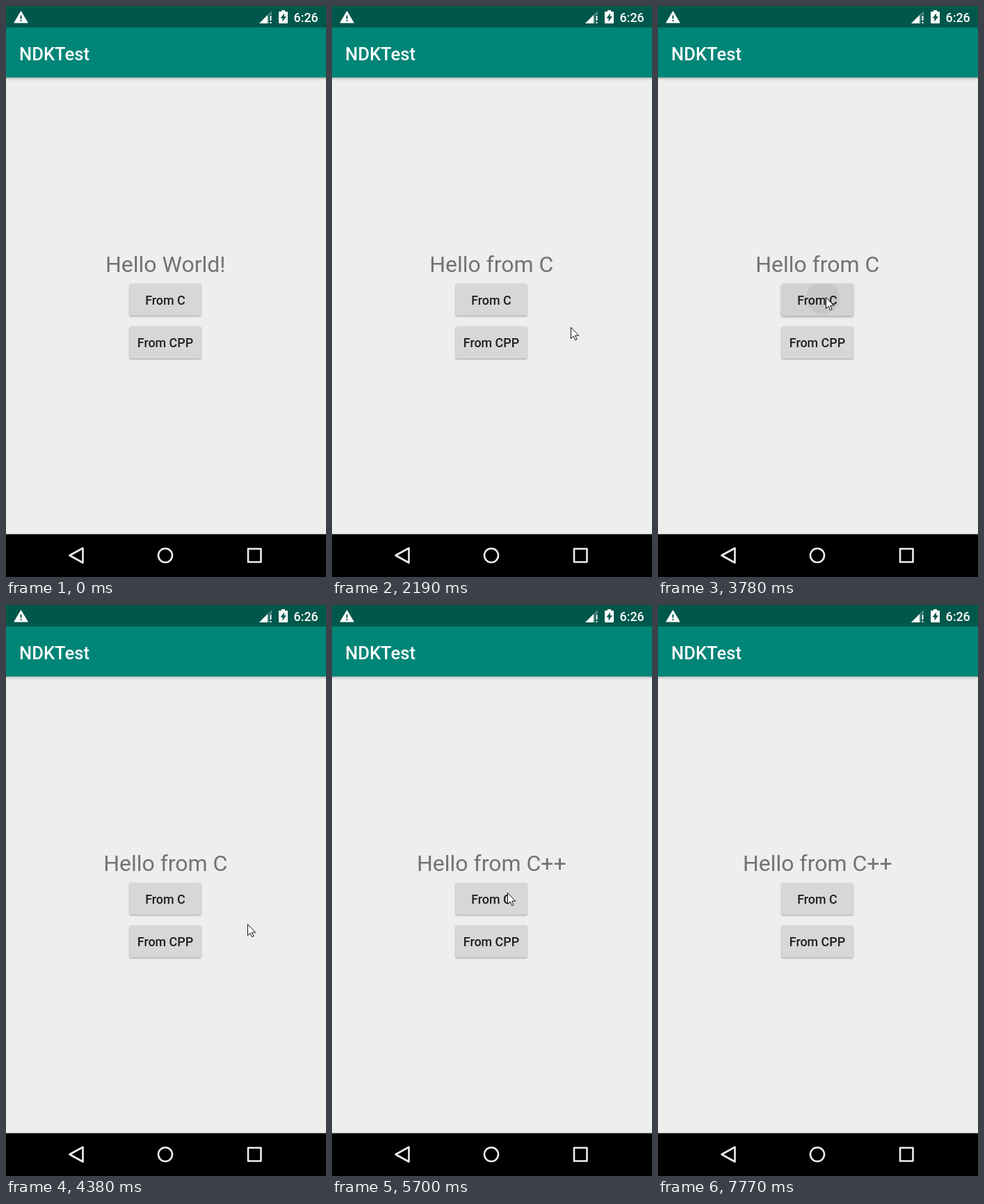
An HTML page with a canvas for the animation above (8.97 s loop, 460 by 820 pixels).

```html
<!DOCTYPE html>
<html lang="en">
<head>
<meta charset="utf-8">
<title>NDKTest</title>
<style>
  html, body { margin: 0; width: 100%; height: 100%; overflow: hidden; background: #eee; }
  canvas { display: block; }
</style>
</head>
<body>
<canvas id="stage" width="460" height="820"></canvas>
<script>
const ctx = document.getElementById('stage').getContext('2d');
const LOOP = 8970, STEP = 30, ENTER = 510, EXIT = 7770;
const DP = 1.28;  // stage pixels per layout unit

const BUTTONS = {
  c: { y: 398.6, label: 'From C', greeting: 'Hello from C' },
  cpp: { y: 460.1, label: 'From CPP', greeting: 'Hello from C++' }
};
const LEFT = 177.4, WIDTH = 103.2, HEIGHT = 36 * DP;

// When the pointer arrives, when it clicks, and where.
const CLICKS = [
  { arrive: 1140, at: 1440, name: 'c', tip: [241, 423] },
  { arrive: 2490, at: 2580, name: 'cpp', tip: [250, 478] },
  { arrive: 3570, at: 3780, name: 'c', tip: [241, 418] },
  { arrive: 4710, at: 4860, name: 'cpp', tip: [250, 478] },
  { arrive: 5820, at: 6000, name: 'c', tip: [230, 411] },
  { arrive: 6960, at: 7080, name: 'cpp', tip: [250, 488] }
];

// Between clicks the pointer swings out to the right and comes back.
const legs = [{ start: ENTER, end: CLICKS[0].arrive, from: [459, 278], to: CLICKS[0].tip }];
CLICKS.forEach((click, i) => {
  const next = CLICKS[i + 1], start = click.at + 150;
  if (!next) {
    legs.push({ start, end: EXIT, from: click.tip, to: [460, 283] });
    return;
  }
  const away = [386 - 5 * i, 440];
  legs.push({ start, end: start + 300, from: click.tip, to: away });
  legs.push({ start: next.arrive - 480, end: next.arrive, from: away, to: next.tip });
});

const clamp = v => Math.max(0, Math.min(1, v));
const mix = (a, b, u) => a + (b - a) * u;

function pointerAt(t) {
  const leg = legs.filter(l => l.start <= t).pop();
  if (!leg || t >= EXIT) return null;
  const u = clamp((t - leg.start) / (leg.end - leg.start));
  return [
    mix(leg.from[0], leg.to[0], u * u * (3 - 2 * u)),
    mix(leg.from[1], leg.to[1], Math.sin(u * Math.PI / 2))
  ];
}

function rect(x, y, w, h, color) {
  ctx.fillStyle = color;
  ctx.fillRect(x, y, w, h);
}

function text(str, x, y, size, color, weight = 500, align = 'left') {
  ctx.font = `${weight} ${size * DP}px Roboto, sans-serif`;
  ctx.textAlign = align;
  ctx.fillStyle = color;
  ctx.fillText(str, x, y);
}

function shape(d, fill, stroke, width) {
  const path = new Path2D(d);
  ctx.lineJoin = 'round';
  if (fill) { ctx.fillStyle = fill; ctx.fill(path); }
  if (stroke) { ctx.strokeStyle = stroke; ctx.lineWidth = width; ctx.stroke(path); }
}

function drawBars() {
  rect(0, 0, 460, 820, '#eee');
  const shade = ctx.createLinearGradient(0, 102, 0, 108);
  shade.addColorStop(0, 'rgba(0,0,0,.3)');
  shade.addColorStop(0.4, 'rgba(0,0,0,.1)');
  shade.addColorStop(1, 'rgba(0,0,0,0)');
  rect(0, 102, 460, 6, shade);
  rect(0, 0, 460, 102.6, '#008577');
  rect(0, 0, 460, 30.8, '#00574b');
  rect(0, 758.5, 460, 61.5, '#000');
  text('NDKTest', 19, 77.5, 20, '#fff');
  text('6:26', 413.5, 22.5, 14, '#fff');

  // warning, signal, battery
  shape('M21.5 8L31 24H12Z', '#fff', '#fff', 1.2);
  rect(20.5, 13.5, 2, 5, '#00574b');
  rect(20.5, 20, 2, 2, '#00574b');
  shape('M364 25L382 7V13H378V25Z', 'rgba(255,255,255,.3)');
  shape('M364 25L376 13V25Z', '#fff');
  rect(379.5, 14, 2, 7, '#fff');
  rect(379.5, 23, 2, 2, '#fff');
  shape('M396 6H401V8H404Q405 8 405 9V24Q405 25 404 25H393Q392 25 392 24V9Q392 8 393 8H396Z', '#fff');
  shape('M400 10.5V15H403L397.5 22.5V17.5H394.5Z', '#00574b');

  // navigation
  shape('M91.5 789L110.5 778.5V799.5Z', null, '#eee', 2.6);
  shape('M239 789A10 10 0 1 1 219 789A10 10 0 1 1 239 789Z', null, '#eee', 2.6);
  shape('M348 779.5H366.5V798.5H348Z', null, '#eee', 2.6);
}

// age: time since the click that pressed this button, or -1
function drawButton(button, age, origin) {
  const pressed = age >= 0;
  const lift = pressed ? Math.min(0.35 + age / 110, 1) * clamp((270 - age) / 120) : 0;
  const glow = pressed ? clamp((330 - age) / 230) : 0;
  ctx.save();
  ctx.shadowColor = `rgba(0,0,0,${0.3 + 0.05 * lift})`;
  ctx.shadowBlur = 2 + 4 * lift;
  ctx.shadowOffsetY = 1.3 + 1.5 * lift;
  ctx.beginPath();
  ctx.roundRect(LEFT, button.y, WIDTH, HEIGHT, 2.5);
  ctx.fillStyle = '#d6d7d7';
  ctx.fill();
  ctx.shadowColor = 'transparent';
  if (glow) {
    ctx.clip();
    rect(LEFT, button.y, WIDTH, HEIGHT, `rgba(0,0,0,${0.022 * glow})`);
    ctx.beginPath();
    ctx.arc(origin[0] - 4, origin[1] + 1, 24 + age * 0.9, 0, 7);
    ctx.fillStyle = `rgba(0,0,0,${0.05 * clamp(1 - age / 80)})`;
    ctx.fill();
  }
  ctx.restore();
  text(button.label, 229, button.y + 29.9, 14, '#1f1f1f', 500, 'center');
}

function drawPointer([x, y]) {
  ctx.save();
  ctx.translate(Math.round(x) + 0.5, Math.round(y) + 0.5);
  shape('M0 0V16L3.7 12.6L6.2 18.2L8.6 17.2L6.1 11.7H11.2Z', '#fff', '#111', 1);
  ctx.restore();
}

function draw(now) {
  const t = Math.floor(now % LOOP / STEP) * STEP;
  const click = CLICKS.filter(c => c.at <= t).pop();
  drawBars();
  const greeting = click ? BUTTONS[click.name].greeting : 'Hello World!';
  text(greeting, 229.3, 382, 25, '#737373', 400, 'center');
  for (const name in BUTTONS) {
    const active = click && click.name === name;
    drawButton(BUTTONS[name], active ? t - click.at : -1, active && click.tip);
  }
  const tip = pointerAt(t);
  if (tip) drawPointer(tip);
}

const start = performance.now();
function tick() {
  draw(performance.now() - start);
  requestAnimationFrame(tick);
}
tick();
</script>
</body>
</html>
```
